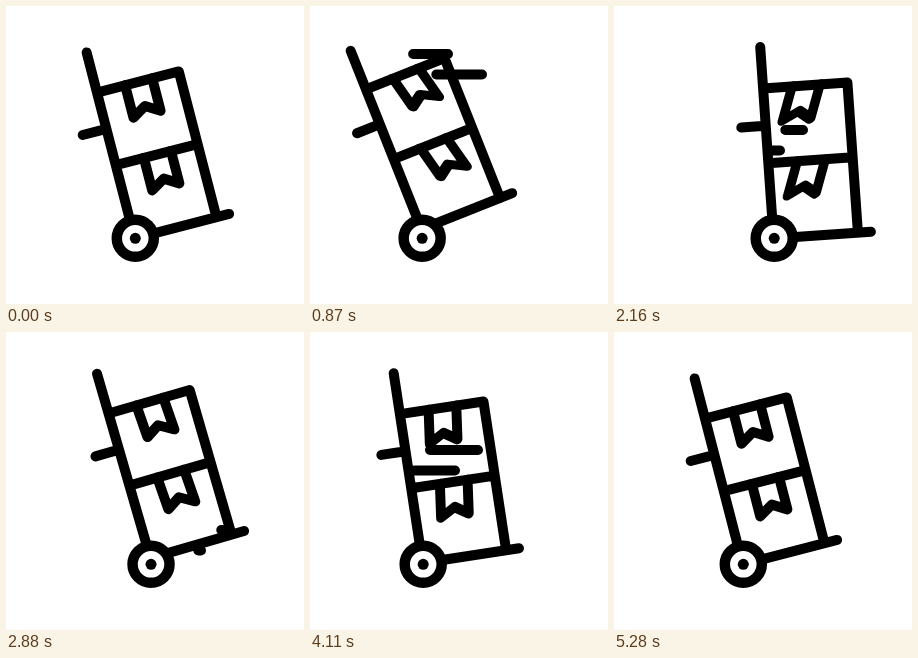
An HTML page that plays this animation: 298 px wide and 298 px high, repeating every 5.4 s.

```html
<!DOCTYPE html>
<html lang="en">
<head>
<meta charset="utf-8">
<title>Hand truck</title>
<style>
  html, body { margin: 0; width: 100%; height: 100%; overflow: hidden; background: #fff; }
  svg { display: block; width: 100vw; height: 100vh; }
  .line { fill: none; stroke: #000; stroke-width: 10; stroke-linecap: round; stroke-linejoin: round; }
</style>
</head>
<body>
<svg viewBox="0 0 298 298">
  <defs><path id="ribbon" d="M29 0V33.5L43 25L57 33.5V0"/></defs>
  <g id="body" class="line">
    <path d="M0 -192V0H97.5M-24.5 -113H0M0 -150.5H84.5V0M0 -75.5H84.5"/>
    <g transform="translate(0 -150.5)"><use class="ribbon" href="#ribbon"/></g>
    <g transform="translate(0 -75.5)"><use class="ribbon" href="#ribbon"/></g>
  </g>
  <g id="wheel">
    <circle r="18.5" fill="#fff" stroke="#000" stroke-width="10.5"/>
    <circle r="5.5"/>
  </g>
  <path id="wind" class="line"/>
</svg>
<script>
const LOOP = 5400, TICK = 30, LAST = 5280;
const AXLE = 232.3, REST = 14.5;

// Turning points as [time, value], eased in between
const ROLL = [[0, 129], [950, 111.5], [1300, 111.5], [2310, 163], [2500, 163], [3500, 106.5], [3600, 106.5], [5050, 129]];
const TILT = [[0, REST], [900, 21.7], [2150, 4], [3250, 20.5], [4250, 8], [LAST, REST]];

// Each gust is two lines: start time, right end, y, and the second line's offset
const GUSTS = [
  [728, 138, 48, 34],
  [1178, 140, 174, -11],
  [2065, 189, 124, -23],
  [2824, 222, 198, -27],
  [3935, 168, 118, -23]
];
const GUST_LENGTH = 88, GUST_GAP = 20.5, GROW = 330, HOLD = 270;

const $ = id => document.getElementById(id);
const body = $('body'), wheel = $('wheel'), wind = $('wind');
const ribbons = document.querySelectorAll('.ribbon');

const smooth = v => {
  const u = Math.min(1, Math.max(0, v));
  return u * u * (3 - 2 * u);
};

const ease = (points, t) => points.slice(1).reduce((sum, [time, value], i) => {
  const [from, base] = points[i];
  return sum + (value - base) * smooth((t - from) / (time - from));
}, points[0][1]);

// A line grows leftwards, then its right end catches up
function gustLine(age, x, y) {
  if (age <= 0 || age >= GROW + HOLD) return '';
  const end = ms => x - GUST_LENGTH * smooth(ms / GROW);
  return `M${end(age - HOLD)} ${y}H${end(age)}`;
}

function draw(t) {
  const x = ease(ROLL, t), tilt = ease(TILT, t);
  const vigour = smooth(t / 600) * (1 - smooth((t - 3600) / 1200));
  const lift = -0.53 * (tilt - 4.5) * vigour;
  const sway = 1.85 * (tilt - REST) * vigour;

  wheel.setAttribute('transform', `translate(${x + 0.3} ${AXLE})`);
  body.setAttribute('transform', `translate(${x - 0.3} ${AXLE + lift}) rotate(${-tilt})`);
  ribbons.forEach(r => r.setAttribute('transform', `skewX(${sway})`));

  // Lines further back start a little later
  wind.setAttribute('d', GUSTS.map(([start, right, y, shift]) =>
    gustLine(t - start, right, y) +
    gustLine(t - start + 0.8 * shift, right + shift, y + GUST_GAP)).join(''));
}

const begin = performance.now();
function frame() {
  const t = (performance.now() - begin) % LOOP;
  draw(Math.min(LAST, Math.floor(t / TICK) * TICK));
  requestAnimationFrame(frame);
}
frame();
</script>
</body>
</html>
```
